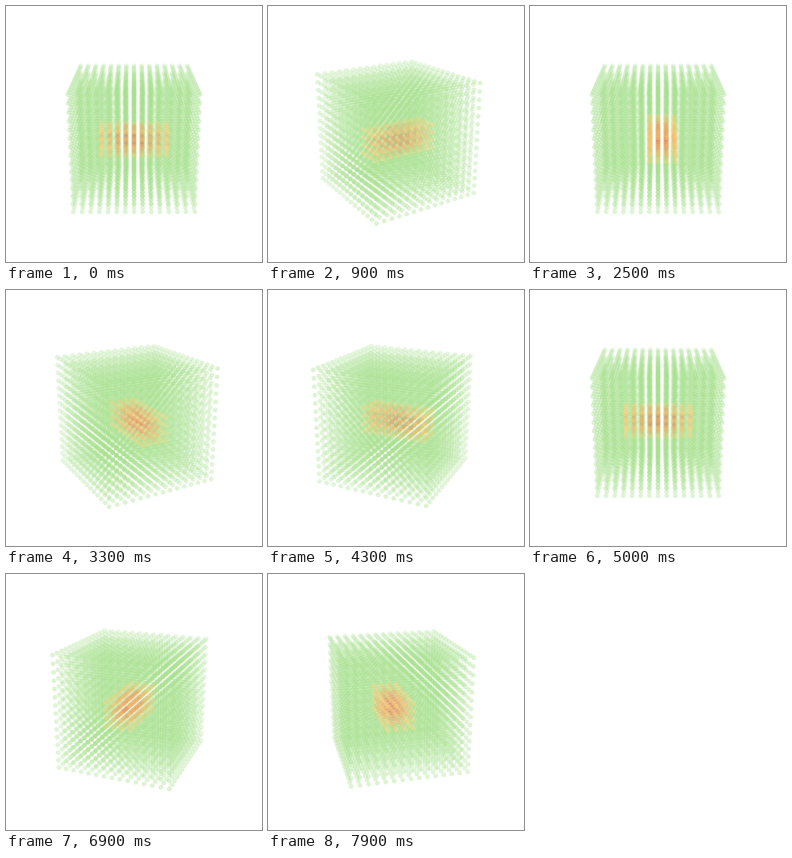
A matplotlib script that plays this animation: 256x256 px, repeating every 8 s.

```python
import numpy as np
import matplotlib.pyplot as plt
from matplotlib.animation import FuncAnimation

SIZE, DPI = 256, 100
FRAMES, INTERVAL = 80, 100
STEP = np.radians(-3.6)
ELEV = np.radians(20)
DIST, FOCAL = 9.0, 510.0
N = 15
DOT = 4.7

GREEN = np.array([166, 225, 140]) / 255
YELLOW = np.array([252, 206, 112]) / 255
ORANGE = np.array([248, 160, 92]) / 255
RED = np.array([236, 104, 74]) / 255

half = N // 2
idx = np.arange(N) - half
grid = np.array(np.meshgrid(idx, idx, idx, indexing="ij")).reshape(3, -1).T
gx, gy, gz = grid.T

# Warm block, long along y
hot = (gx >= -1) & (gx <= 2) & (abs(gy) <= 4) & (gz >= -2) & (gz <= 1)
shell = grid[~hot] / half
block = grid[hot] / half

# Colour falls off from the middle of the block
offset = (grid[hot] - [0.5, 0, -0.5]) / [1.9, 4.4, 1.9]
reach = np.sqrt((offset ** 2).sum(axis=1))
reach += np.random.default_rng(4).uniform(-0.12, 0.12, len(reach))
stops = [0.35, 0.8, 1.2]
warm = np.column_stack([
    np.interp(reach, stops, [RED[c], ORANGE[c], YELLOW[c]]) for c in range(3)
])
cool = np.tile(GREEN, (len(shell), 1))


def project(points, azim):
    """Screen position and nearness of points for one camera angle."""
    x, y, z = points.T
    right = y * np.cos(azim) - x * np.sin(azim)
    front = x * np.cos(azim) + y * np.sin(azim)
    near = front * np.cos(ELEV) + z * np.sin(ELEV)
    up = z * np.cos(ELEV) - front * np.sin(ELEV)
    k = FOCAL / (DIST - near)
    return np.column_stack([SIZE / 2 + k * right, SIZE / 2 - k * up]), near


fig = plt.figure(figsize=(SIZE / DPI, SIZE / DPI), dpi=DPI, facecolor="white")
ax = fig.add_axes([0, 0, 1, 1])
ax.set_xlim(0, SIZE)
ax.set_ylim(SIZE, 0)
ax.axis("off")


def make_dots(points, zorder):
    return ax.scatter(points[:, 0], points[:, 1], s=(DOT * 72 / DPI) ** 2,
                      linewidths=0, zorder=zorder)


layers = [
    (make_dots(shell, 1), shell, cool, 0.22, 0.42),
    (make_dots(block, 2), block, warm, 0.30, 0.46),
]


def update(i):
    for dots, points, colors, low, high in layers:
        pos, near = project(points, i * STEP)
        order = np.argsort(near)
        alpha = np.interp(near, [-1.3, 1.3], [low, high])
        dots.set_offsets(pos[order])
        dots.set_facecolors(np.column_stack([colors, alpha])[order])
    return [layer[0] for layer in layers]


anim = FuncAnimation(fig, update, frames=FRAMES, interval=INTERVAL,
                     repeat=True, repeat_delay=0, blit=False)
plt.show()
```
